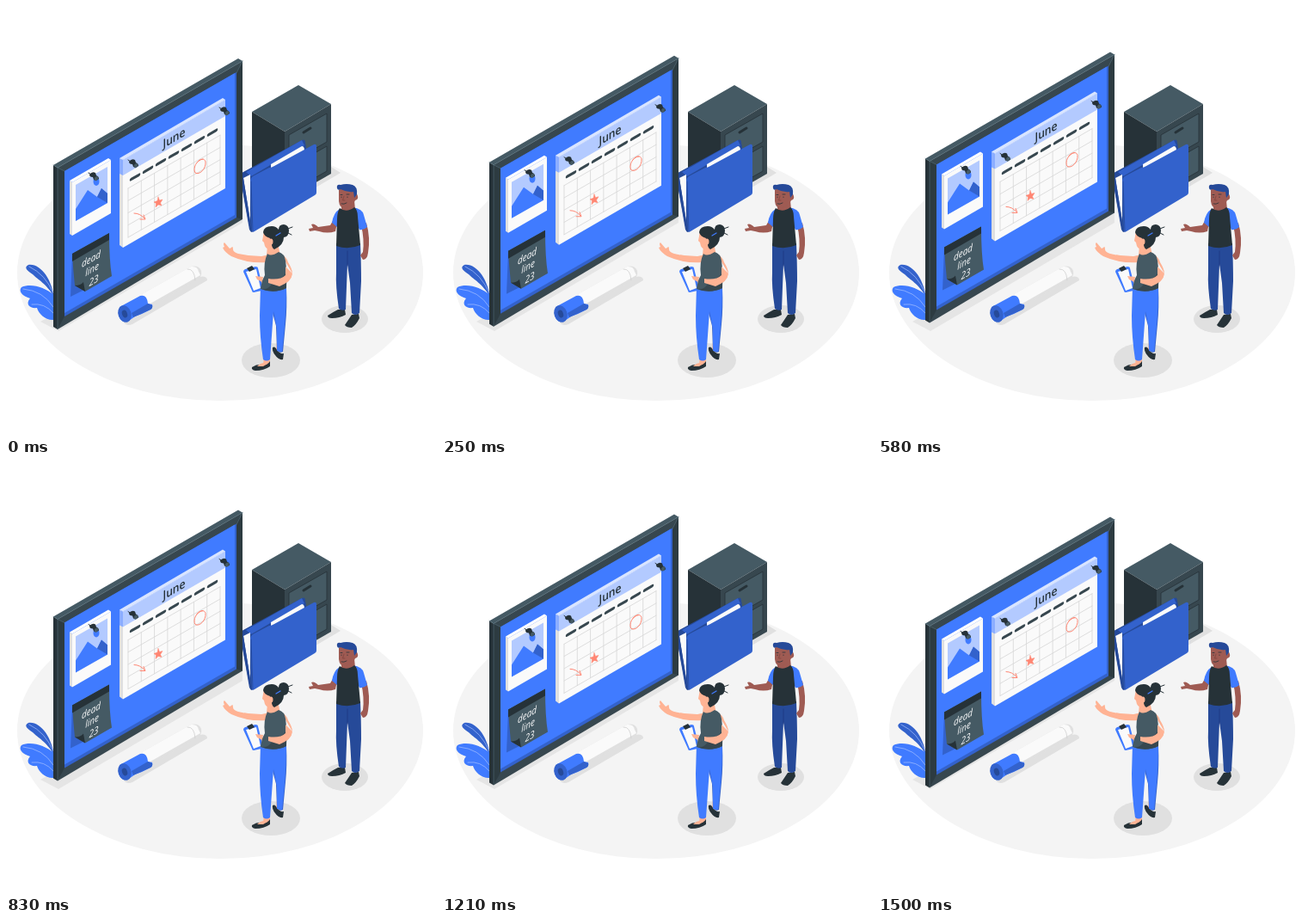
Write an HTML page that moves like this. It is 500x500 px and loops after 1540 ms.

```html
<!DOCTYPE html>
<html lang="en">
<head>
<meta charset="utf-8">
<style>
  html, body { margin: 0; width: 100%; height: 100%; overflow: hidden; background: #fff; }
  svg { display: block; width: 100%; height: 100%; }
  .ink { fill: #263238; }
  .slate { fill: #37474f; }
  .steel { fill: #455a64; }
  .blue { fill: #407bff; }
  .navy { fill: #264a99; }
  .royal { fill: #3362cc; }
  .pale { fill: #b3caff; }
  .paper { fill: #fafafa; }
  .edge { fill: #e0e0e0; }
  .skin { fill: #ffb394; }
  .brown { fill: #9f5b53; }
  .line { fill: none; stroke-linecap: round; stroke-linejoin: round; }
  text { text-anchor: middle; font-family: "Open Sans", sans-serif; }
  .note text { fill: #fff; font-size: 11.5px; font-style: italic; }
</style>
</head>
<body>
<svg viewBox="0 0 500 500">
  <defs>
    <g id="pin">
      <path class="line" stroke="#263238" d="M-6-4 0 0"/>
      <path class="ink" d="M-5-2Q-2-6 2-4L3-1Q6 0 6 3Q3 6 0 4L-1 1Q-5 1-5-2Z"/>
      <ellipse class="steel" cx="3.3" cy="2.5" rx="2" ry="2.7" transform="rotate(30 3 2)"/>
    </g>
  </defs>

  <ellipse cx="249" cy="310" rx="236" ry="149" fill="#f4f4f4"/>
  <g class="edge">
    <path d="M40 367 58 357 275 234V252L61 378Z" opacity=".75"/>
    <path d="M324 221 378 187 389 194 338 224Z"/>
    <path d="M136 366 224 315Q234 313 234 319L147 370Q139 373 136 366Z"/>
    <ellipse cx="308" cy="412" rx="34" ry="20"/>
    <ellipse cx="394" cy="364" rx="27" ry="16"/>
  </g>

  <g id="plant">
    <path class="royal" d="M56 341C54 318 40 299 26 301C20 304 25 308 31 312C38 319 46 322 56 338Z"/>
    <path class="blue" d="M56 336C45 327 29 322 18 327C14 332 19 337 28 340C22 347 28 352 36 351C38 358 46 366 56 365Z"/>
    <path class="line" stroke="#a6c1ff" stroke-width=".7" d="M27 303Q46 312 55 334M20 329Q43 331 55 350M30 347Q45 345 55 357"/>
  </g>

  <g id="cabinet">
    <path class="steel" d="M286 123 340 92 378 114 324 146Z"/>
    <path class="ink" d="M286 123 324 146V226L286 204Z"/>
    <path class="slate" d="M324 146 378 114V195L324 226Z"/>
    <path class="steel" stroke="#263238" stroke-width=".8" d="M329 150 373 125V158L329 183ZM329 188 373 163V192L329 217Z"/>
    <path class="line" stroke="#263238" stroke-width="3" d="M346 147 354 142"/>
  </g>

  <g id="folder">
    <path fill="#264a99" d="M272 197Q273 194 276 193L344 156Q348 154 348 159L356 200 286 263 284 262Z"/>
    <path class="royal" d="M279 193 344 156 347 162 285 198Z"/>
    <path class="paper" d="M276 200 284 196V250Z"/>
    <path class="navy" d="M272 197 276 200 286 263 283 260Z"/>
    <path class="paper" d="M308 184 344 163Q347 163 347 168L308 190Z"/>
    <path class="royal" d="M284 203Q284 200 287 198L306 188Q309 188 312 186L358 161Q361 160 361 163V217Q361 219 359 220L289 262Q286 264 286 260Z"/>
    <path class="line" stroke="#264a99" stroke-width=".8" d="M285 204 287 262"/>
  </g>

  <g id="board">
    <path class="ink" d="M55 185 60 188V376L55 373Z"/>
    <path class="steel" d="M55 185 270 61 275 64 60 188Z"/>
    <path class="slate" d="M60 188 275 64V248L60 376Z"/>
    <path class="ink" d="M275 64V248L268 246V78ZM60 188 68 192V361L60 376Z" opacity=".55"/>
    <path class="line" stroke="#546e7a" stroke-width=".6" d="M55 185 60 188 275 64M60 188V375M60 188 68 192M275 64 268 78"/>
    <path class="royal" d="M68 192 268 77V246L68 361Z"/>
    <path class="blue" d="M68 192 266 78V243L68 357Z"/>

    <path class="edge" d="M74 203 77 205V267L74 265Z"/>
    <path fill="#fff" d="M74 203 119 177 122 179 77 205Z"/>
    <path class="paper" d="M77 205 122 179V241L77 267Z"/>
    <path class="pale" d="M81 208 118 187V229L81 250Z"/>
    <path class="blue" d="M81 250V236L95 214 106 222 111 212 118 218V229Z"/>
    <path class="royal" d="M106 222 111 212 118 218V229Z"/>
    <ellipse class="blue" cx="105" cy="204" rx="3.5" ry="5"/>
    <use href="#pin" x="102" y="198"/>

    <g class="note">
      <path class="royal" d="M77 288 75 338 123 314 100 300Z"/>
      <path class="steel" d="M77 288 120 264Q120 296 123 314L92 332 80 325Q78 306 77 288Z"/>
      <path class="ink" d="M77 288 120 264V272L77 297ZM80 325Q87 325 90 321L92 332Z"/>
      <text transform="matrix(.866 -.5 0 1 99 298)">dead</text>
      <text transform="matrix(.866 -.5 0 1 100 310)">line</text>
      <text transform="matrix(.866 -.5 0 1 102 323)">23</text>
    </g>

    <path class="edge" d="M132 177 136 179V281L132 278Z"/>
    <path class="paper" d="M136 179 255 109V212L136 281Z"/>
    <path class="pale" d="M136 179 255 109V128L136 197Z"/>
    <path fill="#8caeff" d="M132 177 136 179V197L132 195Z"/>
    <path fill="#d9e5ff" d="M132 177 252 107 255 109 136 179Z"/>
    <text class="ink" font-size="14" font-weight="600" transform="matrix(.866 -.5 0 1 195.5 158)">June</text>
    <path class="line" stroke="#37474f" stroke-width="3.5" stroke-dasharray="9 6" transform="translate(145.5 201.6) skewY(-30)" d="M0 0H99"/>
    <path id="grid" class="line" stroke="#d6d6d6" stroke-width=".7" transform="translate(142 212) skewY(-30)"/>
    <g class="line" stroke="#ff8673">
      <path d="M229 178C221 179 217 189 220 194C225 197 233 189 232 181C231 177 226 177 222 182"/>
      <path d="M149 241Q156 241 161 247M156 248 162 248 160 243"/>
      <path fill="#ff8673" stroke-width=".5" d="M177 222 178.500 226 182 225 179.500 229 181 232 177 231 174 234 174.500 229.500 172 228 176 226.500Z"/>
    </g>
    <use href="#pin" x="148" y="183"/>
    <use href="#pin" x="254" y="122"/>
  </g>

  <g id="marker">
    <path class="edge" d="M158 335 215 303Q224 301 227 308Q228 314 224 317L168 350Z"/>
    <path class="paper" d="M158 335 215 303Q223 302 224 309L226 313 166 347Z"/>
    <path class="line" stroke="#d0d0d0" stroke-width=".8" d="M211 306Q219 305 220 319"/>
    <path class="blue" d="M132 350 156 337Q164 335 165 346L170 347Q171 351 168 353L158 358 150 361 143 366Q134 370 131 360Z"/>
    <path class="royal" d="M146 357 165 346 170 348Q171 351 168 353L157 358 148 362Z"/>
    <ellipse class="royal" cx="138" cy="358" rx="7.500" ry="10" transform="rotate(-20 138 358)"/>
    <ellipse class="navy" cx="138" cy="358" rx="3" ry="4.500" transform="rotate(-20 138 358)"/>
  </g>

  <g id="woman">
    <path class="skin" d="M300 404 307 404 307 416 299 419ZM315 390 322 390 320 402 314 401Z"/>
    <path class="ink" d="M286 420Q292 416 299 417Q304 418 307 413L307 419Q300 424 290 424Q285 423 286 420ZM310 397Q313 395 315 400Q319 405 323 404L322 411Q317 412 313 406Q309 401 310 397Z"/>
    <path class="skin" d="M292 419Q298 413 304 416L299 419Z"/>
    <path class="royal" d="M310 332 326 328Q327 350 325 370L322 402Q318 404 315 400L314 372 307 345Z"/>
    <path class="blue" d="M296 326Q309 334 326 328Q326 350 324 372L321 402 315 401 315 375 311 355 307 411Q303 414 299 411Q295 385 295 360Z"/>
    <path class="skin" d="M306 289Q302 290 297 291Q283 291 270 288Q264 286 264 283Q264 278 262 281L260 282 254 275Q252 276 254 280L252 281Q254 286 262 291Q282 300 305 298ZM320 289Q326 291 328 298Q333 306 333 311Q331 317 320 319L298 318 292 314 292 318 298 322 318 326Q332 321 333 311Z"/>
    <path class="skin" d="M304 278 316 276 319 290Q310 294 303 290Z"/>
    <path class="blue" d="M276 309Q276 307 278 306L290 303Q293 303 293 305L299 329Q299 331 297 331L288 333Q286 333 286 331Z"/>
    <path class="paper" d="M279 309 291 306 296 328 288 331Z"/>
    <path class="ink" d="M280 305 286 302 289 306 283 309Z"/>
    <path class="skin" d="M290 314 299 315 298 321 292 318Z"/>
    <path class="steel" d="M304 288Q308 292 317 286Q324 288 325 296Q327 310 326 328Q312 335 296 329Q297 320 301 313Q299 298 304 288Z"/>
    <path class="slate" d="M312 319Q323 317 326 309V328Q312 335 296 329Q306 331 312 319Z"/>
    <path class="skin" d="M325 303 333 311Q331 321 318 326L305 322V317Q319 319 325 313Z"/>
    <path class="skin" d="M300 261Q299 268 298 273L300 275Q301 283 307 283L316 279 316 263Z"/>
    <path class="ink" d="M299 263Q300 256 309 256Q314 256 317 260Q317 254 323 254Q329 255 329 261Q329 268 323 269Q323 278 312 283Q309 281 309 277Q306 275 307 270Q300 268 299 263Z"/>
    <ellipse class="skin" cx="308" cy="274" rx="2.500" ry="3.500"/>
    <path class="line" stroke="#407bff" stroke-width="1.300" d="M314 267 319 264"/>
    <path class="line" stroke="#263238" d="M325 260 333 257M326 263 332 266"/>
  </g>

  <g id="man">
    <path class="ink" d="M374 360Q380 356 386 353L394 353 395 359Q388 363 379 363Q374 363 374 360ZM394 371Q398 365 402 359L410 358 411 363Q407 371 402 374Q396 374 394 371Z"/>
    <path class="navy" d="M384 276 412 276Q413 300 413 320L411 357Q406 361 402 357L400 322 397 300 395 353Q391 355 387 352Q383 325 384 310Z"/>
    <path class="line" stroke="#1c3980" stroke-width=".8" d="M397 302 397 285"/>
    <path class="brown" d="M385 252 383 262Q374 265 364 262L359 261 353 262 352 259 357 258 355 254Q358 252 363 257L377 255 381 248ZM413 255 419 252Q424 270 421 287Q420 295 415 295L412 290 415 286Q417 272 413 255Z"/>
    <path class="blue" d="M388 236Q381 240 379 252L385 257 392 245ZM403 234Q415 236 416 243L420 257Q416 261 411 260L405 248Z"/>
    <path class="brown" d="M390 229 405 226 406 237Q398 242 390 237Z"/>
    <path class="ink" d="M388 235Q396 241 405 234Q409 237 409 245L412 278Q398 284 384 279L385 248Q385 240 388 235Z"/>
    <path class="brown" d="M387 214 387 227Q388 236 395 235Q404 232 406 226Q410 225 409 221L405 211 390 210Z"/>
    <path class="navy" d="M385 212Q384 207 389 208Q396 206 403 208Q409 210 408 219L405 223 404 216Q397 217 389 213Q386 215 385 212Z"/>
    <path class="line" stroke="#263238" stroke-width=".8" d="M389 219.500H391M396 219H399M390 230Q393 231 396 229M390 222V222.500M397 222V222.500"/>
    <path class="line" stroke="#7d403b" stroke-width=".7" d="M393 221 391.500 226H394"/>
  </g>
</svg>
<script>
  const LOOP = 1540, PEAK = 705, RISE = 10, FPS = 24;
  const board = document.getElementById('board');

  let cells = '';
  for (let col = 0; col <= 7; col++) cells += `M${col * 107 / 7} 0v57`;
  for (let row = 0; row <= 4; row++) cells += `M0 ${row * 57 / 4}h107`;
  document.getElementById('grid').setAttribute('d', cells);

  // 0 at the lowest point, 1 at the peak, linear in between
  const lift = t => {
    const gap = Math.abs(t - PEAK);
    return 1 - Math.min(gap, LOOP - gap) / (LOOP / 2);
  };

  function draw(now) {
    const step = Math.floor((now % LOOP) * FPS / 1000 + 0.1);
    const y = RISE * (lift(0) - lift(step * 1000 / FPS));
    board.setAttribute('transform', `translate(0 ${y.toFixed(2)})`);
  }

  const start = performance.now();
  function tick() {
    draw(performance.now() - start);
    requestAnimationFrame(tick);
  }
  tick();
</script>
</body>
</html>
```
